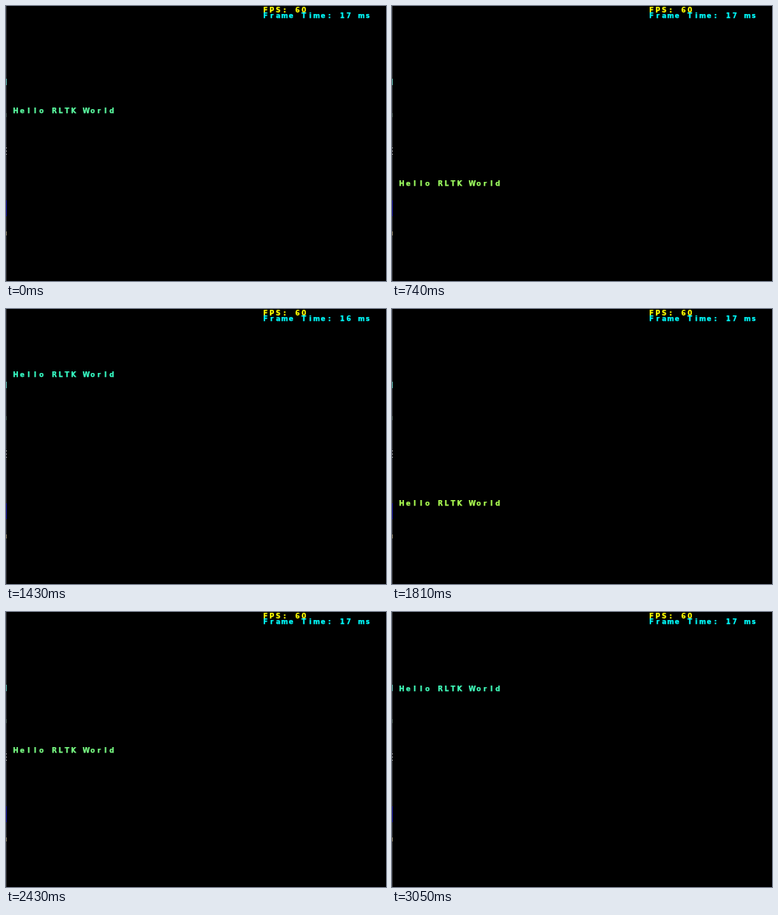
An HTML page with a canvas that plays this animation: 475x344 px, repeating every 3120 ms.

```html
<!DOCTYPE html>
<html lang="en">
<head>
<meta charset="utf-8">
<title>Hello RLTK World</title>
<style>
  html, body { margin: 0; width: 100%; height: 100%; overflow: hidden; background: #000; }
  canvas { display: block; }
</style>
</head>
<body>
<canvas id="stage" width="475" height="344"></canvas>
<script>
const ctx = document.getElementById('stage').getContext('2d', { alpha: false });
const LOOP = 3120, REFRESH = LOOP / 41;
const CELL_W = 8, CELL_H = 7, TOP = 1, BOTTOM = 49;

// Game speed wavers slightly: [time in ms, ticks so far]
const pace = [[0, 18], [510, 53], [1810, 130], [2430, 170], [3050, 205], [LOOP, 210]];

// State at the latest screen refresh
function stateAt(now) {
  const s = pace.findIndex(key => key[0] > now);
  const [t0, n0] = pace[s - 1], [t1, n1] = pace[s];
  const steps = Math.round((t1 - t0) / REFRESH);
  const k = Math.floor((now - t0) / (t1 - t0) * steps) / steps;
  return {
    tick: Math.round(n0 + (n1 - n0) * k),
    refresh: Math.round((t0 + (t1 - t0) * k) / REFRESH)
  };
}

// The greeting bounces between the top and bottom rows.
function rowAt(tick) {
  const span = BOTTOM - TOP;
  return BOTTOM - Math.abs((tick - TOP) % (2 * span) - span);
}

function print(col, row, color, text) {
  ctx.fillStyle = ctx.strokeStyle = color;
  [...text].forEach((ch, i) => {
    const x = (col + i) * CELL_W + 4.3, y = row * CELL_H + 8;
    ctx.fillText(ch, x, y);
    ctx.strokeText(ch, x, y);
  });
}

function edge(y, h, color) {
  ctx.fillStyle = color;
  ctx.fillRect(0, y, 1, h);
}

// Sliver of the desktop along the left side
function drawEdge() {
  edge(0, 344, '#303234');
  edge(91, 8, '#5fb5ab');
  edge(134, 5, '#4a5a54');
  for (let y = 177; y <= 185; y += 4) edge(y, 1, '#b8b8b8');
  edge(243, 20, '#1c1c9c');
  edge(282, 5, '#8c8268');
}

function draw() {
  const { tick, refresh } = stateAt(performance.now() % LOOP);
  const row = rowAt(tick), mix = row / 50;
  const ms = refresh % 4 === 3 ? 16 : 17;

  ctx.fillStyle = '#000';
  ctx.fillRect(0, 0, 475, 344);
  drawEdge();

  ctx.font = 'bold 8.2px "DejaVu Sans", sans-serif';
  ctx.textAlign = 'center';
  ctx.lineWidth = 0.25;
  print(1, row, `rgb(${Math.round(255 * mix)},255,${Math.round(255 * (1 - mix))})`, 'Hello RLTK World');
  print(40, 0, '#ff0', 'FPS: 60');
  print(40, 1, '#0ff', `Frame Time: ${ms} ms`);
  requestAnimationFrame(draw);
}
draw();
</script>
</body>
</html>
```
